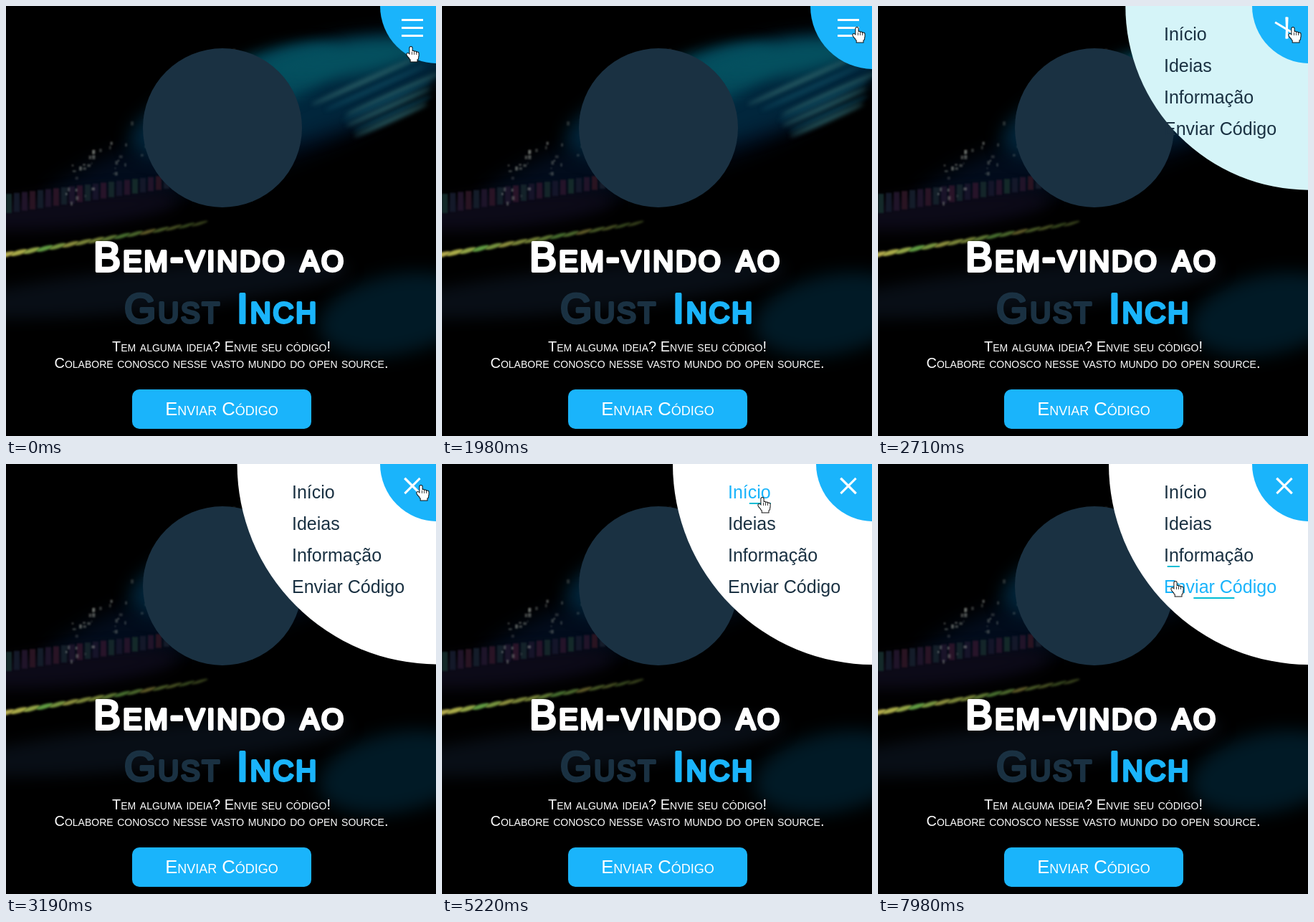
Animation of 600 by 600 pixels, one loop 8 s. Source, as an HTML page with a canvas:

```html
<!DOCTYPE html>
<html lang="pt">
<head>
<meta charset="utf-8">
<title>Menu circular</title>
<style>
  html, body { margin: 0; width: 100%; height: 100%; overflow: hidden; background: #000; }
  canvas { display: block; width: 600px; height: 600px; }
</style>
</head>
<body>
<canvas id="stage" width="600" height="600"></canvas>
<script>
const SIZE = 600, LOOP = 8000;
const BLUE = '#1ab4fb', NAVY = '#1a3142', CYAN = [0, 188, 212];
const SANS = '"Liberation Sans", Arial, sans-serif';
const ctx = document.getElementById('stage').getContext('2d');

const clamp = v => Math.min(1, Math.max(0, v));
const mix = (a, b, p) => a + (b - a) * p;

// CSS "ease": cubic-bezier(.25, .1, .25, 1)
function ease(x) {
  if (x <= 0 || x >= 1) return clamp(x);
  const bezier = (a, b, u) => 3 * a * u * (1 - u) ** 2 + 3 * b * u * u * (1 - u) + u ** 3;
  let lo = 0, hi = 1;
  for (let i = 0; i < 18; i++) {
    const mid = (lo + hi) / 2;
    if (bezier(.25, .25, mid) < x) lo = mid; else hi = mid;
  }
  return bezier(.1, 1, lo);
}
const eased = (t, start, length) => ease((t - start) / length);

function randomizer(seed) {
  return () => (seed = seed * 16807 % 2147483647) / 2147483647;
}

function disc(c, x, y, r, color) {
  c.fillStyle = color;
  c.beginPath();
  c.arc(x, y, r, 0, 7);
  c.fill();
}

function label(c, text, x, y, font, color, align = 'left') {
  c.font = font;
  c.fillStyle = color;
  c.textAlign = align;
  c.fillText(text, x, y);
}

// Round-ended bold lettering: plain letters with a soft outline
function roundLabel(c, text, x, y, color) {
  c.save();
  c.letterSpacing = '2.9px';
  c.lineJoin = c.lineCap = 'round';
  c.lineWidth = 3.8;
  c.strokeStyle = color;
  label(c, text, x, y, `small-caps 57px ${SANS}`, color);
  c.strokeText(text, x, y);
  c.restore();
}

// Soft tilted ellipse
function glow(c, color, x, y, rx, ry, tilt, blur = 10) {
  c.filter = `blur(${blur}px)`;
  c.fillStyle = color;
  c.beginPath();
  c.ellipse(x, y, rx, ry, tilt, 0, 7);
  c.fill();
  c.filter = 'none';
}

function paintBackdrop(c) {
  const rnd = randomizer(41);
  c.fillStyle = '#000';
  c.fillRect(0, 0, SIZE, SIZE);

  glow(c, '#020c1c', 300, 200, 260, 45, -.3, 14);
  glow(c, '#01263c', 400, 125, 235, 62, -.28, 12);
  glow(c, '#04495a', 360, 105, 110, 38, -.35);
  glow(c, '#04505f', 470, 75, 110, 24, -.15);
  glow(c, '#011a26', 545, 430, 110, 55, -.2, 12);
  glow(c, '#080e16', 200, 395, 280, 30, -.1);
  glow(c, '#0c0a18', 90, 285, 150, 24, -.1);

  // light trails sweeping up to the right
  for (let i = 0; i < 7; i++) {
    const color = i % 2 ? '#0c4358' : '#2a5f66';
    glow(c, color, 500 + rnd() * 40, 105 + i * 9, 80 - i * 4, 3, -.42, 3);
  }

  c.save();
  c.filter = 'blur(1px)';
  for (let i = 0; i < 24; i++) {
    c.fillStyle = `hsl(${180 + i * 47 % 150} 35% 12%)`;
    c.fillRect(i * 11, 262 - i * 1.3, 8, 27 - i * .4);
  }
  // scattered sparks, densest along the diagonal
  for (let i = 0; i < 70; i++) {
    const u = rnd(), spread = rnd() * 60;
    c.globalAlpha = .15 + rnd() * .35;
    c.fillStyle = '#a3a9a2';
    c.fillRect(80 + u * 240, 225 + spread - u * 170, 2 + rnd() * 3, 2 + rnd() * 4);
  }
  c.restore();

  // fading row of bright dashes
  for (let i = 0; i < 16; i++) {
    const tone = `hsl(${50 + rnd() * 50} 40% ${50 - i * 2.2}%)`;
    glow(c, tone, i * 18, 347 - i * 2.9, 12, 3.5 - i * .1, -.3, 1.5);
  }
}

function paintPage(c) {
  paintBackdrop(c);
  disc(c, 302, 170, 111, NAVY);
  roundLabel(c, 'Bem-vindo ao', 122, 370, '#fff');
  roundLabel(c, 'Gust', 165, 442, NAVY);
  roundLabel(c, 'Inch', 322, 442, BLUE);
  const small = `small-caps 20px ${SANS}`;
  label(c, 'Tem alguma ideia? Envie seu código!', 300.5, 482, small, '#fff', 'center');
  label(c, 'Colabore conosco nesse vasto mundo do open source.', 300.5, 505, small, '#fff', 'center');
  c.fillStyle = BLUE;
  c.beginPath();
  c.roundRect(176, 535, 250, 55, 10);
  c.fill();
  label(c, 'Enviar Código', 301, 571, `small-caps 25.6px ${SANS}`, '#fff', 'center');
}

const page = document.createElement('canvas');
page.width = page.height = SIZE;
paintPage(page.getContext('2d'));

const OPEN = 2390, CORNER = 602;
// go / travel: pointer journey; enter: moment the item becomes hovered
const ITEMS = [
  { text: 'Início', go: 4380, travel: 780, enter: 4720, x: 447, y: 47 },
  { text: 'Ideias', go: 5550, travel: 240, enter: 5665, x: 412, y: 81 },
  { text: 'Informação', go: 6550, travel: 180, enter: 6670, x: 405, y: 131 },
  { text: 'Enviar Código', go: 7680, travel: 180, enter: 7765, x: 415, y: 164 }
];

// The pointer settles on the corner button, dips below it once, then visits each item.
function pointerAt(t) {
  const settle = eased(t, 0, 800);
  const dip = Math.sin(Math.PI * clamp((t - 840) / 840)) ** 2;
  let x = mix(565, 579, settle), y = mix(57, 30, settle) + 150 * dip;
  for (const item of ITEMS) {
    const p = eased(t, item.go, item.travel);
    x = mix(x, item.x, p);
    y = mix(y, item.y, p);
  }
  return [Math.round(x), Math.round(y)];
}

function drawMenu(t) {
  const age = t - OPEN;
  if (age <= 0) return;
  const tint = eased(t, OPEN, 600);
  const color = `rgb(${CYAN.map(v => Math.round(mix(v, 255, tint)))})`;
  disc(ctx, CORNER, 0, 280 * (1 - Math.exp(-age * .00775)), color);

  ctx.globalAlpha = clamp((t - 2540) / 120);
  ITEMS.forEach(({ text, enter }, i) => {
    const x = 399, y = 48 + i * 44;
    const leave = i + 1 < ITEMS.length ? ITEMS[i + 1].enter : LOOP;
    const hovered = t >= enter && t < leave;
    label(ctx, text, x, y, `25px ${SANS}`, hovered ? BLUE : NAVY);
    const p = eased(t, enter, 500) - eased(t, leave, 500);
    const half = ctx.measureText(text).width / 2;
    ctx.fillStyle = `rgb(${CYAN})`;
    ctx.fillRect(x + half * p * p, y + 6, half * p, 2);
  });
  ctx.globalAlpha = 1;
}

function drawBar(offset, angle) {
  ctx.save();
  ctx.translate(567, 30.5);
  ctx.rotate(angle);
  ctx.fillRect(-15, offset - 1.5, 30, 3);
  ctx.restore();
}

function drawToggle(t) {
  const hover = eased(t, 30, 450) - eased(t, 1000, 400) + eased(t, 1515, 400) - eased(t, OPEN, 300);
  disc(ctx, CORNER, 0, 80 + 8 * hover, BLUE);
  const turn = eased(t, OPEN, 800), gap = 11 * (1 - turn);
  ctx.fillStyle = '#fff';
  drawBar(-gap, turn * Math.PI * .75);
  drawBar(0, turn * Math.PI * .25);
  drawBar(gap, -turn * Math.PI * .75);
}

function handShape() {
  const hand = new Path2D();
  for (let i = 0; i < 4; i++) {
    const top = i ? 5 + i * .8 : 0;
    hand.roundRect(-1.6 + i * 3, top, 3.2, 14 - top, 1.6);
  }
  hand.roundRect(-2, 10, 12.2, 8, 3);
  hand.rect(-.3, 15, 8.8, 5.5);
  const thumb = new Path2D();
  thumb.ellipse(-2.8, 12.2, 3.8, 1.7, .9, 0, 7);
  hand.addPath(thumb);
  return hand;
}
const HAND = handShape();

function drawPointer(t) {
  ctx.save();
  ctx.translate(...pointerAt(t));
  ctx.fillStyle = '#fff';
  ctx.strokeStyle = '#111';
  ctx.lineWidth = 2;
  ctx.stroke(HAND);
  ctx.fill(HAND);
  ctx.fillStyle = '#111';
  for (let i = 1; i < 4; i++) ctx.fillRect(-1.8 + i * 3, 7, .8, 4);
  ctx.restore();
}

function render(t) {
  ctx.drawImage(page, 0, 0);
  drawMenu(t);
  drawToggle(t);
  drawPointer(t);
}

const began = performance.now();
function tick() {
  render((performance.now() - began) % LOOP);
  requestAnimationFrame(tick);
}
tick();
</script>
</body>
</html>
```
